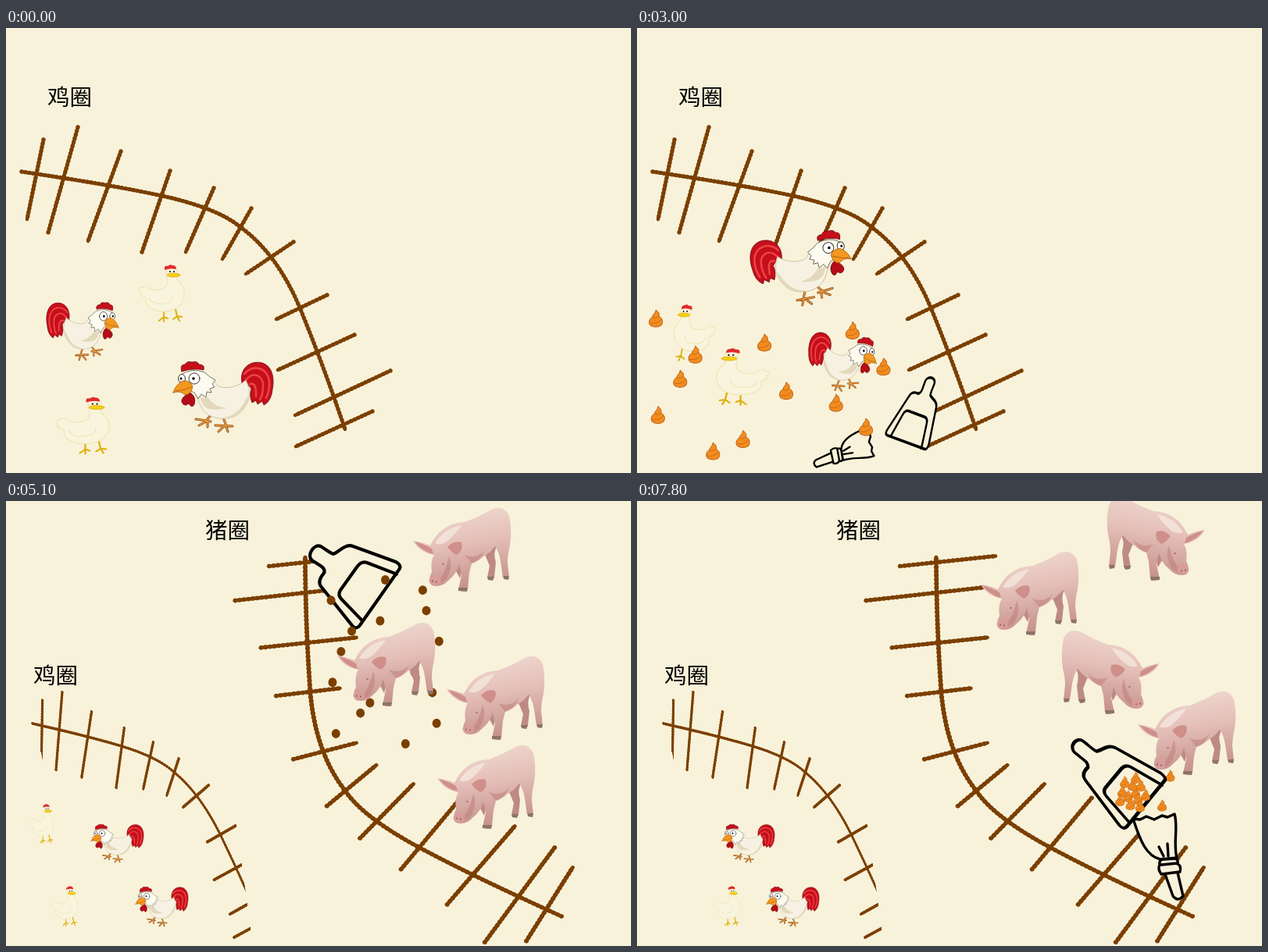
Write an HTML page that moves like this. It is 800x570 px and loops after 8 s.

```html
<!DOCTYPE html>
<html lang="zh">
<head>
<meta charset="utf-8">
<style>
html, body { margin: 0; width: 100%; height: 100%; overflow: hidden; background: #f8f2da; }
svg { display: block; width: 800px; height: 570px; }
text { font: 300 28.5px "Noto Sans CJK SC", "Noto Sans CJK", sans-serif; }
.rail { fill: none; stroke: #7b3f00; stroke-width: 4.4; stroke-linecap: round; stroke-linejoin: round; }
.bead { stroke-width: 5.4; stroke-dasharray: 0 5; }
.ink { fill: none; stroke: #000; stroke-width: 4.2; stroke-linejoin: round; stroke-linecap: round; }
.thin { stroke-width: 3.4; }
.paper { fill: #f8f2da; }
</style>
</head>
<body>
<svg viewBox="0 0 800 570">
<defs>
  <linearGradient id="skin" x1=".3" y1="0" x2=".5" y2="1">
    <stop offset="0" stop-color="#f0dbd1"/><stop offset=".45" stop-color="#e4bfb8"/><stop offset="1" stop-color="#c48e88"/>
  </linearGradient>
  <clipPath id="crop"><path d="M0 0H421L408 570H29V232H0Z"/></clipPath>

  <path id="rail" d="M20 184C80 193 140 202 200 215C245 225 280 238 300 255C335 280 360 320 376 358C398 412 415 458 434 514
    M48 143L27 245M92 127L54 262M147 158L105 273M210 183L174 287M266 205L230 287M314 231L277 296
    M368 274L307 315M411 342L346 373M446 393L348 438M492 439L370 496M469 491L371 536"/>
  <g id="fence"><use href="#rail" class="rail"/><use href="#rail" class="rail bead"/></g>

  <g id="rooster" transform="translate(-64 -45.5)" stroke-linejoin="round" stroke-linecap="round">
    <path id="claws" fill="none" stroke="#8a4a16" stroke-width="3" d="M49 68L42 76M29 74L48 77M33 82L44 76L44 84M64 72L67 80M54 82L76 83M58 90L67 81L70 90"/>
    <path fill="none" stroke="#ee9a3c" stroke-width="1.5" d="M49 68L42 76M29 74L48 77M33 82L44 76L44 84M64 72L67 80M54 82L76 83M58 90L67 81L70 90"/>
    <path fill="#c60f1b" stroke="#6d0a10" stroke-width=".8" d="M88 28C84 8 100-2 114 2C127 6 130 22 127 36C126 46 122 53 116 56L114 51L108 55L106 50L101 53Q97 44 100 35Q95 27 88 28Z"/>
    <path fill="none" stroke="#ec4246" stroke-width="2.6" d="M91 16C100 4 121 6 123 26Q124 36 119 47M93 24C102 12 116 18 115 32Q115 42 111 49M98 29Q107 26 106 45"/>
    <path fill="#f6f1e2" stroke="#c4b998" stroke-width=".8" d="M44 20C52 22 54 28 58 32C70 36 84 32 93 24C99 36 100 50 89 62C80 75 56 77 43 67C34 60 32 48 28 40Z"/>
    <path fill="#e3d8bb" d="M34 44Q38 48 44 46Q52 58 68 60Q50 64 42 59Q36 55 34 44ZM64 72C78 70 88 62 95 44Q98 54 88 62Q78 74 64 72Z"/>
    <path fill="#fdfaf0" stroke="#6a6350" stroke-width=".9" d="M12 16Q24 8 40 14Q46 20 54 24L50 29L53 33L47 35L49 40L43 39L42 46L36 42L32 48L27 40L14 34Z"/>
    <path fill="#b50d18" stroke="#6d0a10" stroke-width=".8" d="M22 40Q30 46 27 55Q24 61 20 54Q14 59 11 52Q10 47 18 42Z"/>
    <path fill="#c60f1b" stroke="#6d0a10" stroke-width=".8" d="M11 13Q8 4 15 4Q18-1 24 1Q31-1 33 4Q41 4 39 11Q25 8 11 13Z"/>
    <g fill="#fff" stroke="#3d382e"><ellipse cx="11" cy="22" rx="4.500" ry="5.500"/><circle cx="27" cy="22" r="7"/></g>
    <circle cx="10" cy="22" r="1.5"/><circle cx="26" cy="22" r="1.8"/>
    <path fill="#f4981f" stroke="#a85a10" stroke-width=".8" d="M0 40Q3 30 12 25Q22 24 25 32Q23 43 15 43Q10 37 0 40Z"/>
    <path fill="none" stroke="#b8641a" d="M3 38Q13 38 23 33"/>
  </g>

  <g id="hen" transform="translate(-31 -37)" stroke-linejoin="round" stroke-linecap="round">
    <path fill="none" stroke="#dfb010" stroke-width="2" d="M34 60L34 68M28 72L34 67L34 73M34 67L39 69M49 57L51 67M46 70L51 66L54 72M51 66L57 67"/>
    <path fill="#f9f4dd" stroke="#f2e6b6" stroke-width="1.2" d="M37 9C38 3 50 3 52 10L51 20C58 26 62 34 60 42C58 52 48 60 34 60C18 60 9 52 11 42C4 40 1 36 5 36C0 31 2 28 7 30C8 25 12 28 14 30C22 34 34 34 38 26C40 20 37 14 37 9Z"/>
    <path fill="none" stroke="#f2e6b6" stroke-width="1.2" d="M15 43Q22 55 42 48Q46 44 45 40"/>
    <path fill="#e02a2c" d="M35 7Q34 1 39 2Q42-1 45 1Q50 1 50 6Q42 4 35 7Z"/>
    <circle cx="42" cy="9" r="1"/><circle cx="47" cy="9" r="1"/>
    <ellipse cx="46.500" cy="13.500" rx="8.500" ry="2.500" fill="#f6cf12" stroke="#d9a90c" stroke-width=".7"/>
  </g>

  <g id="pig" transform="translate(-63 -55)">
    <path fill="#bd8a84" d="M88 52L98 76L95 91Q100 97 104 91L106 72Q102 58 108 50ZM48 70L60 92L66 70Z"/>
    <path fill="url(#skin)" d="M0 44Q10 45 22 50Q28 38 36 31Q50 20 66 20Q85 13 100 4Q116-3 123 12Q127 30 124 50Q121 62 121 72L123 91Q119 95 115 91L112 70Q110 58 105 51Q98 60 90 64Q84 70 75 73L72 85L70 106Q66 111 58 107L62 88L59 74Q56 86 46 94Q36 105 24 101Q18 95 24 84Q22 70 27 62Q9 59 0 44Z"/>
    <path fill="#f6eae0" opacity=".75" d="M28 47Q40 28 62 24Q54 36 42 46Q34 50 28 47Z"/>
    <path fill="#cf8f8a" d="M44 52Q52 43 62 46Q65 56 56 62Q50 60 44 52ZM2 45Q14 48 24 54L26 61Q11 57 2 45Z"/>
    <path fill="#bd7d78" opacity=".5" d="M46 64Q52 78 42 94Q34 100 30 99Q42 84 46 64ZM66 62Q82 68 92 56Q86 70 75 73Z"/>
    <ellipse cx="28" cy="95" rx="7.500" ry="6" fill="#d89c9a"/>
    <path fill="none" stroke="#85605b" stroke-width="1.600" stroke-linecap="round" d="M25 95v1M30 96v1M38 74h1"/>
    <path fill="#8e736a" d="M58 104L70 104L69 109L58 108ZM116 89L123 89L122 94L116 93ZM95 90L104 90L102 95L96 94Z"/>
  </g>

  <g id="pan">
    <path class="ink paper" style="fill:#f8f2da" d="M-13-97C-12-107 6-108 8-99C9-90 8-84 10-80C16-76 30-76 33-66L50-10Q51-1 45-1L-43 2Q-50 2-49-5L-33-67Q-31-76-16-75Q-11-78-12-84Z"/>
    <path class="ink" d="M38 0L27-39Q25-46 16-46L-22-45Q-29-44-30-37L-36 1"/>
  </g>
  <g id="broom" style="fill:#f8f2da">
    <path class="ink thin" style="fill:inherit" d="M14 73L24 101Q30 109 37 101L30 71M-27 2C-18 30-10 50 8 54L29 52C24 34 31 12 26-4L17 0L10-2L0 3L-10-1L-18 3Z"/>
    <path class="ink thin" style="fill:inherit" d="M7 61Q6 54 12 54L27 53Q31 54 30 60Q35 62 33 70L9 73Q4 66 7 61ZM9 61L29 59"/>
    <path class="ink thin" d="M6 38L12 50M17 34L18 50"/>
  </g>
  <ellipse id="grain" rx="5.500" ry="6" fill="#7b3f00"/>
  <g id="dung" stroke-linejoin="round">
    <path fill="#f28c1e" stroke="#b9601a" d="M0-11C4-8 5-6 4-3C9 0 10 5 7 9Q0 13-7 9C-10 5-8 0-4-2C-4-6 0-6 0-11Z"/>
    <path fill="none" stroke="#c56a14" d="M-4-1Q1 1 4-3M-7 6Q1 8 7 1"/>
  </g>
</defs>
<g id="scene"></g>
</svg>
<script>
const STEP = 300, LOOP = 8000, SWITCH = 15, SPIN = 2.38;

const put = (id, x, y, sx = 1, sy = 1, turn = 0) =>
  `<use href="#${id}" transform="translate(${x} ${y}) rotate(${turn}) scale(${sx} ${sy})"/>`;
const many = (id, spots, size = 1) => spots.map(([x, y]) => put(id, x, y, size, size)).join("");
const label = (s, x, y) => `<text x="${x}" y="${y}">${s}</text>`;
const clamp = (v, lo, hi) => Math.min(hi, Math.max(lo, v));

// Swings from side to side while going down
const scatter = (n, x, y, w, h, phase) => Array.from({ length: n }, (_, i) =>
  [x + w * (.5 + .5 * Math.sin(phase + SPIN * i)), y + h * i / (n - 1)]);

// Round pile lying in a pan
function heap(n, [x, y, , , turn], gap) {
  const a = turn * Math.PI / 180;
  return Array.from({ length: n }, (_, i) => {
    const r = gap * Math.sqrt(i + .5);
    return [x + 22 * Math.sin(a) + r * Math.cos(SPIN * i), y - 22 * Math.cos(a) + r * Math.sin(SPIN * i)];
  });
}

// Keys: step, x, y, x scale, y scale, turn. Facing and size come from the nearer key.
function at(keys, n) {
  const j = keys.findIndex(k => k[0] >= n);
  if (j < 1) return keys.at(j).slice(1);
  const a = keys[j - 1], b = keys[j], f = (n - a[0]) / (b[0] - a[0]);
  return [a[1] + (b[1] - a[1]) * f, a[2] + (b[2] - a[2]) * f, ...(f < .5 ? a : b).slice(3)];
}

const flock = {
  henA: ["hen", [0, 199, 340], [4, 251, 315, -1], [10, 74, 391, -.9]],
  henB: ["hen", [0, 98, 509.5, 1.16], [4, 81, 509.5, 1.16], [10, 136, 447, -1.16]],
  small: ["rooster", [0, 98, 388.5, -.72, .82], [4, 81, 409, -.69, .8, 7], [10, 262, 429, -.69, .8, 7]],
  big: ["rooster", [0, 278, 472.5], [4, 244.5, 508, 1, 1, 8], [10, 211.5, 310, -1, 1, -8]]
};
const herd = [
  [[15, 551, 99], [17, 584, 62], [21, 558, 134, -1], [26, 664, 48, -1]],
  [[15, 711, 183], [17, 627, 252], [21, 659, 197], [26, 503, 118]],
  [[15, 549, 267, -1], [17, 487, 209], [21, 720, 300, -1], [26, 606, 219, -1]],
  [[15, 730, 359, -1], [17, 615, 366], [21, 768, 399], [26, 704, 297]]
];
const yardPan = [[10, 344, 530, .57, .84, 23], [14, 60, 400, .57, .84, 23]];
const feedPan = [[15, 316, 278, 1, 1, -53], [17, 477, 124, 1, 1, -53]];
const styPan = [[22, 440, 210, .86, 1.14, -48], [26, 650, 388, .86, 1.14, -48]];

const yardGrain = scatter(12, 145, 290, 65, 209, 1.4);
const styGrain = scatter(17, 416, 101, 139, 210, 0);
const yardDung = scatter(12, 24, 372, 292, 170, -1.57);
const styDung = scatter(8, 444, 124, 340, 266, -1.3);

function chickenYard(n) {
  const pan = at(yardPan, n), sweeping = n >= 10;
  const dung = sweeping ? yardDung.filter(([x]) => x < pan[0]) : yardDung.slice(0, Math.max(0, n - 6) * 4);
  let s = label("鸡圈", 53, 99) + put("fence", 0, 0);
  s += many("grain", yardGrain.slice(0, clamp(4 * (7 - n), 0, 3 * n)));
  for (const [id, ...keys] of Object.values(flock)) s += put(id, ...at(keys, n));
  if (sweeping) {
    s += put("pan", ...pan) + put("broom", pan[0] - 45, pan[1], .71, .71, 85);
    s += many("dung", heap(12 - dung.length, pan, 4), .5);
  }
  return s + many("dung", dung);
}

function pigSty(n) {
  let s = label("鸡圈", 35, 234) + label("猪圈", 255, 48);
  s += `<g transform="matrix(-1.0786 -.3223 .359 -.9896 666.5 720.5)">${put("fence", 0, 0)}</g>`;
  s += `<g transform="matrix(.618 .034 .115 .745 .5 147.3)"><g clip-path="url(#crop)">${put("fence", 0, 0)}</g></g>`;
  s += put("rooster", 142.5, 438.5, .525, .54) + put("rooster", 199.5, 519.5, .525, .56);
  s += n < 18 ? put("hen", 45.5, 413.5, .53, .69) + put("hen", 75, 519, .58, .7) : put("hen", 114.5, 519, .58, .7);

  const feed = at(feedPan, n), pan = at(styPan, n), sweeping = n >= 22;
  if (n <= 17) s += put("pan", ...feed);
  s += many("grain", n < 17 ? heap(13, feed, 6.8) : styGrain.slice((n - 17) * 5));
  const dung = sweeping ? styDung.filter(([, y]) => y > pan[1] - 40) : styDung.slice(0, Math.max(0, n - 19) * 4);
  s += many("dung", dung, .66);
  for (const keys of herd) s += put("pig", ...at(keys, n));
  if (sweeping) {
    s += put("pan", ...pan) + many("dung", heap(2 * (8 - dung.length), pan, 6), .66);
    s += put("broom", pan[0] + 12, pan[1] + 17);
  }
  return s;
}

const scene = document.getElementById("scene");
let shown = -1;
function tick() {
  const n = Math.floor(performance.now() % LOOP / STEP);
  if (n !== shown) {
    shown = n;
    scene.innerHTML = n < SWITCH ? chickenYard(n) : pigSty(n);
  }
  requestAnimationFrame(tick);
}
tick();
</script>
</body>
</html>
```
